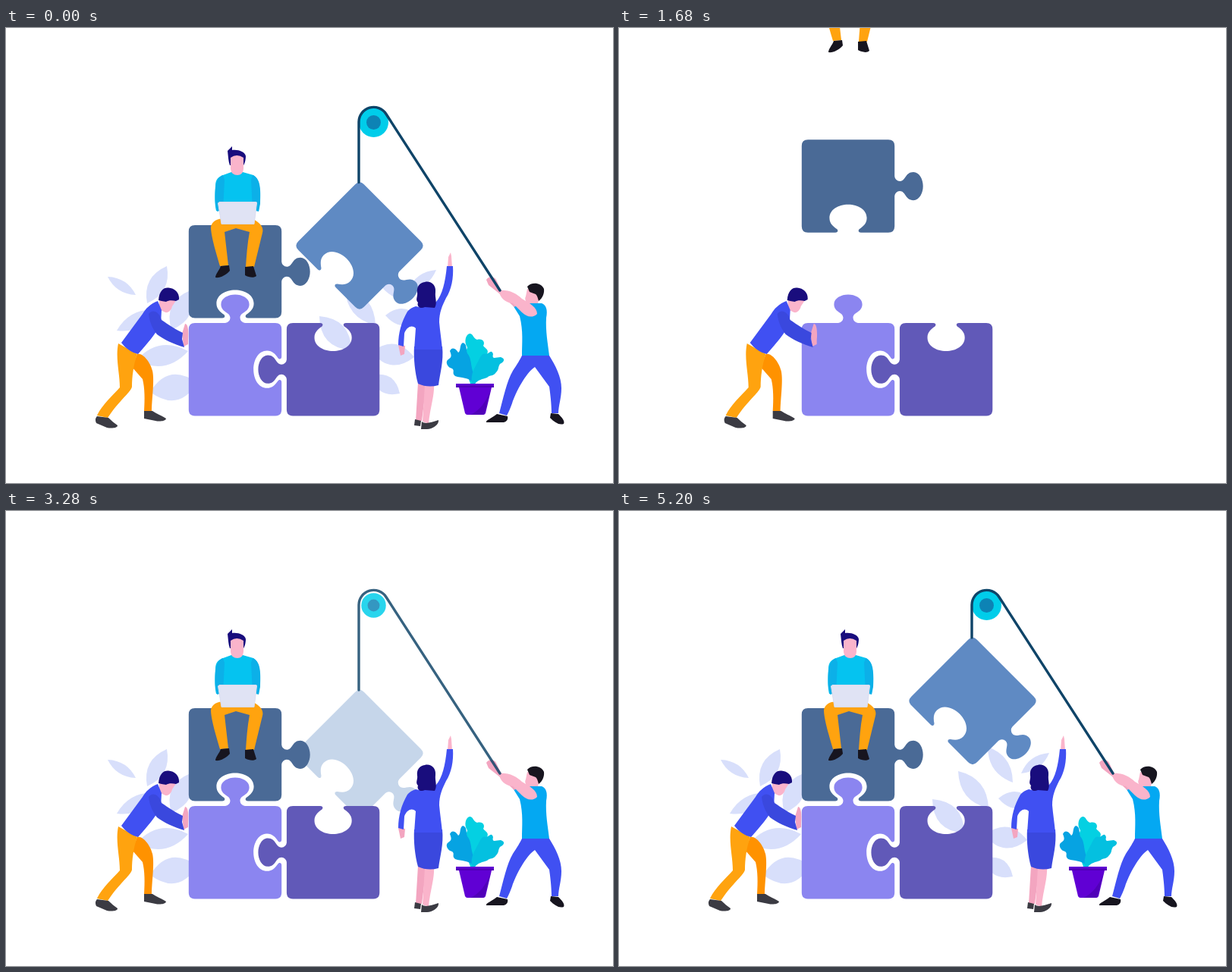
Recreate the animation shown at these times as an HTML page. Size 800 by 600 pixels, loop 5520 ms.

```html
<!DOCTYPE html>
<html lang="en">
<head>
<meta charset="utf-8">
<title>Puzzle team</title>
<style>
html, body { margin: 0; width: 100%; height: 100%; overflow: hidden; background: #fff; }
svg { display: block; width: 100%; height: 100%; }
.skin { fill: #fab4cb; } .skin2 { fill: #f3a5c0; }
.hair { fill: #190d7d; }
.blue { fill: #4050f2; } .blue2 { fill: #3a48de; }
.orange { fill: #ffa30f; } .orange2 { fill: #ff9200; }
.cyan { fill: #05c3f0; } .cyan2 { fill: #0cb0e8; }
.shoe { fill: #3b3b43; } .dark { fill: #17151f; }
</style>
</head>
<body>
<svg id="stage" viewBox="0 0 800 600">
  <defs>
    <path id="piece" d="M-53-61.2H53Q61.2-61.2 61.2-53V-13A7 7 0 0 0 68-6.5C76-6.5 75-18.6 86-18.6C94-18.6 98.7-9 98.7 0S94 18.6 86 18.6C75 18.6 76 6.5 68 6.5A7 7 0 0 0 61.2 13V53Q61.2 61.2 53 61.2H17C13 61.2 13 58 15 56.5C20 53 24.6 49 24.6 42C24.6 31 13 24.2 0 24.2S-24.6 31-24.6 42C-24.6 49-20 53-15 56.5C-13 58-13 61.2-17 61.2H-53Q-61.2 61.2-61.2 53V-53Q-61.2-61.2-53-61.2Z"/>
  </defs>

  <path id="leavesLeft" fill="#d8dffb"/>
  <path id="leavesRight" fill="#d8dffb"/>
  <use id="hoist" href="#piece" fill="#5f8ac3"/>

  <g id="slate"><use href="#piece" transform="translate(302 321.3)" fill="#4a6a96"/></g>
  <g id="lilac"><use href="#piece" transform="translate(302 450.2) rotate(-90)" fill="#8b85f0"/></g>
  <g id="violet"><use href="#piece" transform="translate(431.1 450.2) rotate(180)" fill="#6159b8"/></g>

  <g id="pusher">
    <path class="skin" d="M202 357L225 358L219 367C218 372 214 376 210 375L202 371Z"/>
    <path class="hair" d="M201 359C202 346 208 342 214 342.5C222 343 229 349 228 358L224 360C219 359 214 359 211 361L205 360Z"/>
    <path class="orange2" d="M173 430C180 428 190 440 193 452C196 465 192 490 192 506L182 505C183 490 183 475 180 463L166 447Z"/>
    <path class="orange" d="M148 416L173 430C168 444 166 460 166 473C165 480 150 490 134 514L120 511C125 499 140 485 150 474C150 455 144 435 148 416Z"/>
    <path class="shoe" d="M120 512L135 514C139 518 143 521 147 524C147 528 138 528 133 527L119 521C117 517 118 514 120 512ZM182 505L193 505C199 509 205 511 211 515C210 519 201 519 197 518L182 515Z"/>
    <path class="blue" d="M200 360C190 364 184 370 180 377L152 415C158 423 166 428 174 430C186 417 197 403 204 391L205 372Z"/>
    <path class="skin2" d="M236 390C240 390 241 400 240 412V417L234 420L232 403Z"/>
    <path class="blue2" d="M188 377C192 371 201 372 205 385C214 391 224 398 233 402L232 410L235 421C222 417 208 411 199 404C192 395 189 386 188 377Z"/>
  </g>

  <g id="sitter">
    <path class="orange" d="M270 262C272 254 280 250 290 252H325C334 256 340 262 338 270L327 315H316C317 300 318 285 321 269L303 264L288 269L293 313L282 314C278 300 270 275 270 262Z"/>
    <path class="dark" d="M283 314L294 313L295 320C290 326 282 330 276 329C276 324 281 320 283 314ZM315 315L326 314L330 327C327 330 320 329 315 326Z"/>
    <path class="cyan" d="M286 194L297 190H312L326 194C333 198 335 208 335 225L333 241H277C275 232 275 222 276 208C276 200 280 196 286 194Z"/>
    <path class="cyan2" d="M286 194C276 198 275 210 276 232L278 242L286 240L288 200ZM325 194C335 198 336 210 335 232L333 242L325 240L323 200Z"/>
    <path class="hair" d="M292 162L298 156V161C306 160 315 163 316 169C316 175 314 180 313 181H295C293 176 293 170 292 162Z"/>
    <path class="skin" d="M296 171Q304 165 313 171V186Q312 194 305 194Q297 194 296 186Z"/>
    <path id="laptop" stroke="#d9dcef" d="M281 229.5H329Q331 229.5 330.5 231L327 258.5H284L279.5 231Z"/>
  </g>

  <g id="woman">
    <path class="skin2" d="M543 468L554 470L548 518H540ZM517 418L526 419L525 430L520 432Z"/>
    <path class="skin" d="M552 470H564C565 485 558 505 557 522L549 519ZM582 316L583 302L586 296L587 301L588 316Z"/>
    <path class="shoe" d="M539 516L547 518L546 525L538 524ZM548 519C553 523 560 520 570 517C571 523 562 529 555 529H547Z"/>
    <path class="blue2" d="M538 420H575C577 440 572 455 570 471Q556 475 543 469C539 455 537 435 538 420Z"/>
    <path class="blue" d="M540 367C550 370 560 366 567 361C575 352 579 335 581 314H589C590 330 587 345 580 356C575 366 571 375 571 388C572 400 574 412 575 424H538L540 396C534 390 527 396 525 403L524 420L517 418C517 402 521 388 529 374Q533 369 540 367Z"/>
    <path class="hair" d="M552 335C560 333 567 339 566 348C565 356 569 362 565 369L552 368C546 371 541 367 543 362C539 358 543 354 542 349C541 341 545 336 552 335Z"/>
  </g>

  <g id="plant">
    <path fill="#04d0e2" d="M612 469C606 455 612 445 607 437C602 431 607 426 608 421C603 414 606 404 611 403C616 403 616 410 621 411C628 409 632 414 629 419C632 423 637 424 634 430C632 438 634 450 626 460L618 469Z"/>
    <path fill="#06a3e2" d="M616 468C610 460 600 462 592 459C587 455 592 452 588 449C582 448 578 440 583 437C588 434 587 431 585 426C588 419 594 424 596 428C600 426 597 418 602 415C608 416 606 424 608 429C614 436 612 445 616 455Z"/>
    <path fill="#04c0e0" d="M614 469C612 455 618 448 622 440C626 432 628 428 633 430C638 428 640 424 642 430C640 438 646 434 652 434C659 436 656 441 651 443C648 448 650 450 646 454C642 460 638 457 634 461C628 463 622 464 618 469Z"/>
    <path fill="#6000d4" d="M593 469H643V474H640L632 508Q631 510 629 510H608Q606 510 605 508L597 474H593Z"/>
    <path fill="#5000b8" d="M593 471.5H643V474H593ZM639 476L631 508Q630 510 628 510H612Q630 502 639 476Z"/>
  </g>

  <g id="puller">
    <path class="skin" d="M687 344L698 348L703 355L700 367H690C685 362 683 357 685 354Z"/>
    <path class="dark" d="M687 341C692 335 705 335 709 344C710 352 705 358 702 360Q700 352 698 351L690 348Z"/>
    <path class="blue" d="M680 432H716C724 445 732 460 732 475C732 488 728 498 728 508H719C719 495 717 480 716 473L697 447C685 455 672 480 667 495C664 503 662 508 660 511L650 508C655 490 660 465 668 452C674 443 677 438 680 432Z"/>
    <path class="dark" d="M647 509L661 512C662 516 660 519 656 520L633 520C632 517 640 515 647 509ZM718 508L728 509C732 513 737 518 735 522C729 524 723 520 717 514Z"/>
    <path fill="#04a8f2" d="M667 364L682 363L706 363C712 365 714 372 712 382C711 400 714 415 716 432H680C680 415 682 400 677 380Z"/>
    <path class="skin2" d="M633 332C636 327 643 327 646 332L652 345L678 362L670 368L650 350L636 339Z"/>
    <path class="skin" d="M649 346C664 345 672 350 680 357C690 363 700 368 700 377C694 383 686 381 680 375L668 363C658 362 652 357 649 346Z"/>
  </g>

  <g id="pulley">
    <circle r="19.5" fill="#00cdea"/>
    <circle r="9.5" fill="#0d83b5"/>
  </g>
  <path id="rope" fill="none" stroke="#0f4468" stroke-width="3.4" stroke-linecap="round"/>
</svg>
<script>
const LOOP = 5520, HOLD = 480, START = 1000, LAST = 52, SLIDE = 5;
const el = id => document.getElementById(id);
const clamp = v => Math.min(1, Math.max(0, v));
const ramp = (k, from, to) => clamp((k - from) / (to - from));
const backOut = p => 1 + 2.7 * (p - 1) ** 3 + 1.7 * (p - 1) ** 2;

// Each part: start step, start offset x, y
const entries = {
  violet: [9.81, 468, 0],
  lilac: [11.71, -364, 0],
  pusher: [14.53, -242, 0],
  slate: [16, 0, -383],
  sitter: [16.89, 0, -330],
  plant: [19, 0, 198],
  woman: [21.05, 0, 305],
  puller: [24, 0, 273]
};

const leaf = ([x1, y1, x2, y2, w]) => {
  const len = Math.hypot(x2 - x1, y2 - y1);
  const mx = (x1 + x2) / 2, my = (y1 + y2) / 2;
  const nx = (y1 - y2) / len * w, ny = (x2 - x1) / len * w;
  return `M${x1} ${y1}Q${mx + nx} ${my + ny} ${x2} ${y2}Q${mx - nx} ${my - ny} ${x1} ${y1}Z`;
};
const setLeaves = (id, list) => el(id).setAttribute('d', list.map(leaf).join(''));

setLeaves('leavesLeft', [
  [134, 328, 171, 352, 13], [212, 314, 186, 363, 22], [146, 399, 200, 372, 20],
  [243, 346, 218, 398, 26], [172, 438, 240, 426, 27], [190, 480, 252, 468, 34]
]);
setLeaves('leavesRight', [
  [486, 311, 519, 358, 20], [567, 319, 530, 346, 14], [447, 343, 487, 392, 24],
  [500, 379, 545, 383, 22], [482, 427, 538, 434, 28], [482, 458, 519, 482, 22],
  [413, 380, 455, 425, 28]
]);

// The picture advances about ten times a second, on a 40 ms grid
const stepAt = t => Math.min(LAST, 2 * Math.floor(t / 200) + (t % 200 >= 80 ? 1 : 0));

function draw(t) {
  const opening = t < HOLD;
  el('stage').style.visibility = opening || t >= START ? 'visible' : 'hidden';
  const k = opening ? LAST : stepAt(t);

  for (const [id, [start, dx, dy]] of Object.entries(entries)) {
    const rest = 1 - backOut(ramp(k, start, start + SLIDE));
    el(id).setAttribute('transform', `translate(${dx * rest} ${dy * rest})`);
  }
  el('laptop').setAttribute('fill', k < 27 ? '#fff' : '#e0e3f4');

  const lift = (1 - Math.cos(Math.PI * ramp(k, 30, 50))) / 2;
  const top = opening ? 203.5 : 240 - 73 * lift;
  const rig = ramp(k, 28, 34);
  el('hoist').setAttribute('transform', `translate(466 ${top + 83.5}) rotate(45)`);
  el('hoist').setAttribute('opacity', ramp(k, 30, 38.5));
  el('rope').setAttribute('d', `M465 ${top}V124A19.5 19.5 0 0 1 501 113.5L651 346`);
  el('rope').setAttribute('opacity', rig);
  el('pulley').setAttribute('transform', `translate(484.5 124.5) scale(${rig})`);
  el('pulley').setAttribute('opacity', rig);
  el('leavesLeft').setAttribute('opacity', ramp(k, 27, 32));
  el('leavesRight').setAttribute('opacity', ramp(k, 35, 41));
}

function tick() {
  draw(performance.now() % LOOP);
  requestAnimationFrame(tick);
}
tick();
</script>
</body>
</html>
```
